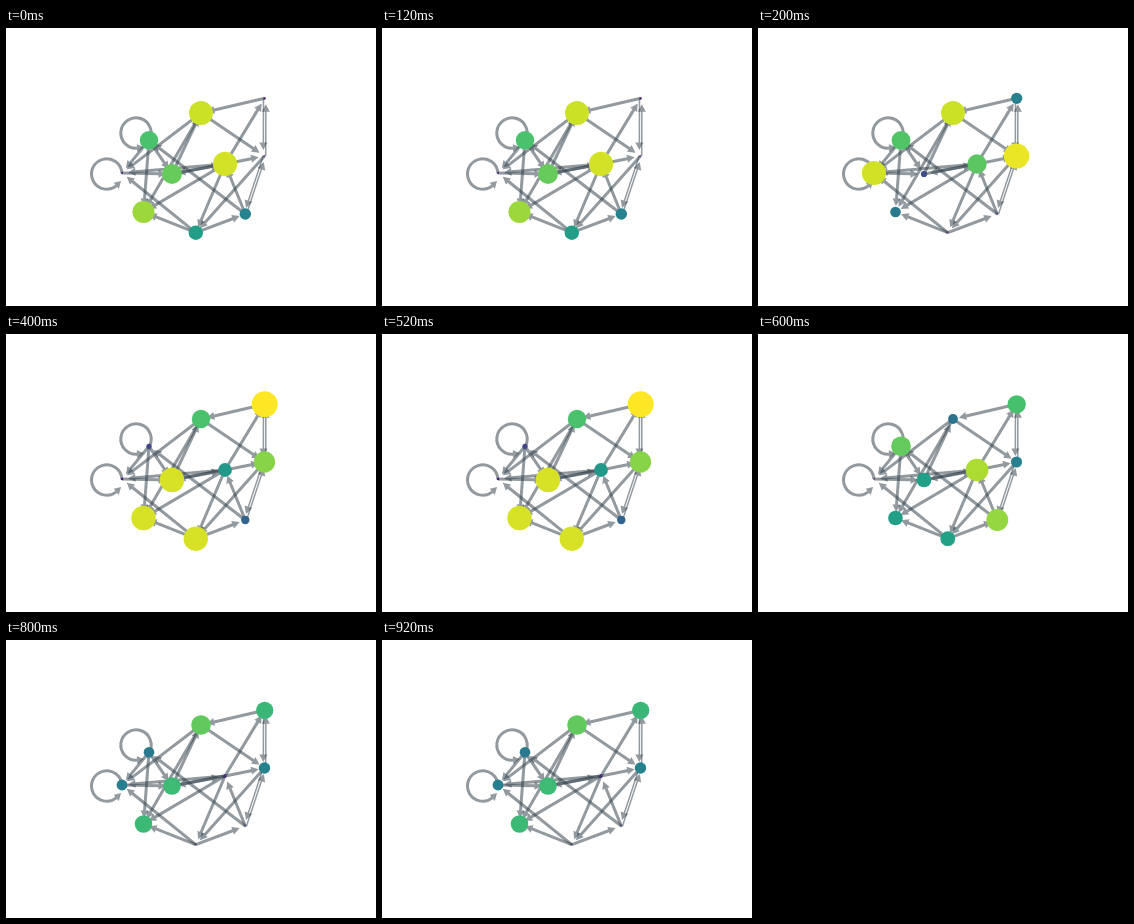
An HTML page for the animation above (1 s loop, 370 by 278 pixels).

```html
<!DOCTYPE html>
<html lang="en">
<head>
<meta charset="utf-8">
<title>Network activity</title>
<style>
html, body { margin: 0; width: 100%; height: 100%; overflow: hidden; background: #fff; }
svg { display: block; width: 100vw; height: 100vh; }
.edge { fill: #36454f; fill-opacity: .54; }
.loop { fill: none; stroke: #36454f; stroke-width: 3; stroke-opacity: .54; }
</style>
</head>
<body>
<svg id="stage" viewBox="0 0 370 278"></svg>
<script>
const LOOP = 1000, MAX_R = 13, GAP = 6, HEAD = 7.5, WING = 4;
const stage = document.getElementById('stage');

// position, then activity level at each step
const nodes = {
  A: [195, 85, [.92, .92, .71, .38, .755]],
  B: [143, 112.3, [.71, .725, .2, .76, .41]],
  C: [116, 145, [.08, .93, .1, .06, .42]],
  D: [166, 146, [.765, .24, .94, .565, .68]],
  E: [219, 136, [.935, .745, .53, .875, .13]],
  F: [258.5, 128, [.06, .97, .82, .43, .44]],
  G: [258.7, 70.3, [.09, .43, 1, .705, .665]],
  H: [239.3, 186, [.44, .06, .325, .84, .06]],
  I: [189.8, 204.7, [.555, .06, .94, .57, .06]],
  J: [137.5, 184, [.85, .41, .94, .565, .675]]
};
const edges = 'GA AF AC AJ DA EG EF DE ED EC EJ EI HE FI IH IJ IC HB BJ BC BD CD'.split(' ');
const pairs = ['FG', 'GF', 'FH', 'HF'];

const scale = ['440154', '482475', '414487', '355f8d', '2a788e', '21918c',
  '22a884', '44bf70', '7ad151', 'bddf26', 'fde725']
  .map(h => [0, 2, 4].map(i => parseInt(h.slice(i, i + 2), 16)));

function color(v) {
  const x = v * (scale.length - 1), i = Math.min(Math.floor(x), scale.length - 2);
  return `rgb(${scale[i].map((c, k) => Math.round(c + (scale[i + 1][k] - c) * (x - i)))})`;
}

function add(tag, attrs) {
  const el = document.createElementNS('http://www.w3.org/2000/svg', tag);
  for (const k in attrs) el.setAttribute(k, attrs[k]);
  return stage.appendChild(el);
}

// shaft and head as one shape, so the opacity stays even
function arrow([from, to], half, shift) {
  const [x1, y1] = nodes[from], [x2, y2] = nodes[to];
  const len = Math.hypot(x2 - x1, y2 - y1), ux = (x2 - x1) / len, uy = (y2 - y1) / len;
  const tip = len - GAP, base = tip - HEAD;
  const points = [
    [0, shift - half], [base, shift - half], [base, shift - WING], [tip, shift],
    [base, shift + WING], [base, shift + half], [0, shift + half]
  ].map(([a, b]) => `${x1 + ux * a - uy * b},${y1 + uy * a + ux * b}`).join(' ');
  add('polygon', { class: 'edge', points });
}

function selfLoop(cx, cy, r, start, end) {
  const at = (deg, rad) => {
    const t = deg * Math.PI / 180;
    return [cx + rad * Math.cos(t), cy + rad * Math.sin(t)];
  };
  const base = end + 25;
  add('path', { class: 'loop', d: `M${at(start, r)}A${r} ${r} 0 1 0 ${at(base, r)}` });
  add('polygon', {
    class: 'edge',
    points: [at(base, r - WING), at(end, r + .8), at(base, r + WING)].join(' ')
  });
}

selfLoop(130, 105, 15.2, 29, 61);
selfLoop(100.7, 146, 15.2, -4, 26);
edges.forEach(e => arrow(e, 1.5, 0));
pairs.forEach(e => arrow(e, .75, 1.2));

for (const [x, y, levels] of Object.values(nodes)) {
  const dot = add('circle', { cx: x, cy: y });
  const steps = [...levels, levels[levels.length - 1]].map((v, i) => ({
    r: `${MAX_R * v}px`, fill: color(v), offset: i / levels.length, easing: 'steps(1, end)'
  }));
  dot.animate(steps, { duration: LOOP, iterations: Infinity });
}
</script>
</body>
</html>
```
